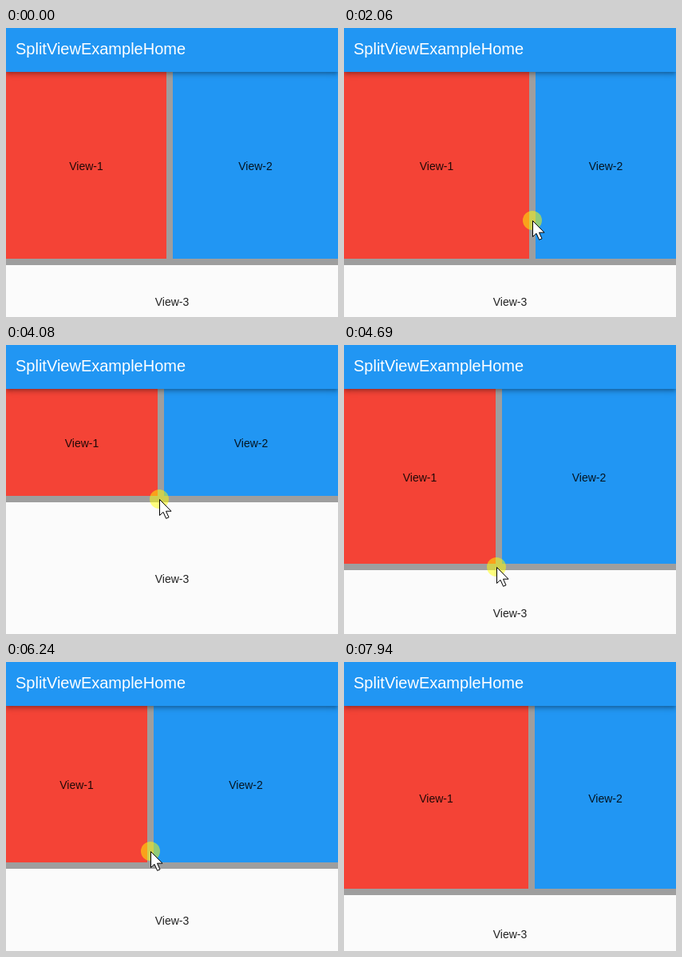
Write an HTML page that moves like this. It is 416x362 px and loops after 8640 ms.

```html
<!DOCTYPE html>
<html lang="en">
<head>
<meta charset="utf-8">
<title>Split view</title>
<style>
  html, body { margin: 0; width: 100%; height: 100%; overflow: hidden; }
  body { background: #fbfbfb; font: 14px "Liberation Sans", Arial, sans-serif; color: #000000de; }
  #stage { position: relative; width: 416px; height: 362px; overflow: hidden; --x: 201px; --y: 289px; }
  #stage > * { position: absolute; box-sizing: border-box; }
  header {
    left: 0; top: 0; width: 416px; height: 55px; padding: 15px 0 0 12px;
    background: #2196f3; color: #fff; font-size: 20px; line-height: 23px;
    box-shadow: 0 2px 4px -1px #0003, 0 4px 5px #00000024, 0 1px 10px #0000001f;
  }
  .view { display: flex; align-items: center; justify-content: center; padding-top: 2px; line-height: 16px; }
  .one, .two { top: 55px; height: calc(var(--y) - 55px); }
  .one { left: 0; width: var(--x); background: #f44336; }
  .two { left: calc(var(--x) + 8px); right: 0; background: #2196f3; }
  .three { left: 0; right: 0; top: calc(var(--y) + 8px); height: calc(379px - var(--y)); }
  .bar { background: #9e9e9e; }
  .upright { left: var(--x); top: 55px; width: 8px; height: calc(var(--y) - 55px); }
  .level { left: 0; top: var(--y); width: 416px; height: 8px; }
  #pointer { left: 0; top: 0; width: 1px; height: 1px; overflow: visible; }
</style>
</head>
<body>
<div id="stage">
  <div class="view one">View-1</div>
  <div class="view two">View-2</div>
  <div class="view three">View-3</div>
  <div class="bar upright"></div>
  <div class="bar level"></div>
  <header>SplitViewExampleHome</header>
  <svg id="pointer">
    <circle id="press" r="12" fill="#ff0" fill-opacity=".5"/>
    <path d="M.5 .5V20.5L5 16.3L8.6 24.3L12 22.8L8.5 15.2H15Z" fill="#fff" stroke="#000"/>
  </svg>
</div>
<script>
  const LOOP = 8640;
  const rest = { x: 201, y: 289, cx: 260, cy: 311, press: 0, show: 0 };

  // Each move runs n steps between two times; path maps a step to the values reached there.
  const moves = [
    { from: 130, to: 210, n: 2, path: { 1: { show: 1 }, 2: { cx: 244, cy: 272 } } },
    { from: 360, to: 750, n: 6, path: { 6: { cx: 197, cy: 234 } } },
    { from: 980, to: 1130, n: 3, path: { 3: { cx: 207, cy: 235 } } },
    { from: 1360, to: 1820, n: 7, path: { 7: { x: 265, cx: 269, cy: 238, press: 1 } } },
    { from: 1990, to: 2520, n: 8, path: {
      2: { x: 232, cx: 236, cy: 241 }, 8: { x: 151, cx: 155, cy: 243 } } },
    { from: 2690, to: 3150, n: 7, path: {
      5: { x: 190, cx: 194, cy: 245 }, 7: { cy: 280, press: 0 } } },
    { from: 3300, to: 3460, n: 3, path: { 3: { cx: 193, cy: 285 } } },
    { from: 3690, to: 4080, n: 6, path: {
      1: { cx: 192, cy: 290, press: 1 }, 6: { y: 189, cy: 193 } } },
    { from: 4230, to: 4850, n: 9, path: {
      5: { y: 297, cy: 301 }, 9: { y: 251, cx: 190, cy: 255 } } },
    { from: 5000, to: 5150, n: 3, path: { 3: { cx: 193, cy: 227, press: 0 } } },
    { from: 5470, to: 6320, n: 12, path: {
      3: { x: 265, cx: 271, cy: 233, press: 1 },
      5: { x: 309, cx: 313, cy: 235 },
      12: { x: 155, cx: 159, cy: 237 } } },
    { from: 6390, to: 6930, n: 8, path: {
      5: { x: 231, cx: 235, cy: 236 }, 8: { cx: 229, cy: 255, press: 0 } } },
    { from: 7160, to: 7620, n: 7, path: {
      1: { y: 256, cy: 260, press: 1 },
      4: { y: 320, cy: 324 },
      7: { y: 284, cx: 231, cy: 288 } } },
    { from: 7790, to: 7940, n: 3, path: {
      1: { cx: 245, cy: 298, press: 0 }, 2: { cx: 264, cy: 312 }, 3: { show: 0 } } }
  ];

  function mix(a, b, p) {
    const state = { ...b };
    for (const key of ["x", "y", "cx", "cy"]) state[key] = Math.round(a[key] + (b[key] - a[key]) * p);
    return state;
  }

  const poses = [{ time: 0, ...rest }];
  let last = rest;
  for (const { from, to, n, path } of moves) {
    let done = 0;
    for (const key in path) {
      const next = { ...last, ...path[key] };
      for (let k = done + 1; k <= +key; k++) {
        const time = Math.floor((from + (to - from) * (k - 1) / (n - 1)) / 10) * 10;
        poses.push({ ...mix(last, next, (k - done) / (key - done)), time });
      }
      last = next;
      done = +key;
    }
  }

  const stage = document.getElementById("stage");
  const pointer = document.getElementById("pointer");
  const press = document.getElementById("press");
  let shown;

  function draw() {
    const now = performance.now() % LOOP;
    const pose = poses.findLast(p => p.time <= now);
    if (pose !== shown) {
      shown = pose;
      stage.style.setProperty("--x", pose.x + "px");
      stage.style.setProperty("--y", pose.y + "px");
      pointer.style.transform = `translate(${pose.cx}px, ${pose.cy}px)`;
      pointer.style.visibility = pose.show ? "visible" : "hidden";
      press.style.display = pose.press ? "" : "none";
    }
    requestAnimationFrame(draw);
  }
  draw();
</script>
</body>
</html>
```
